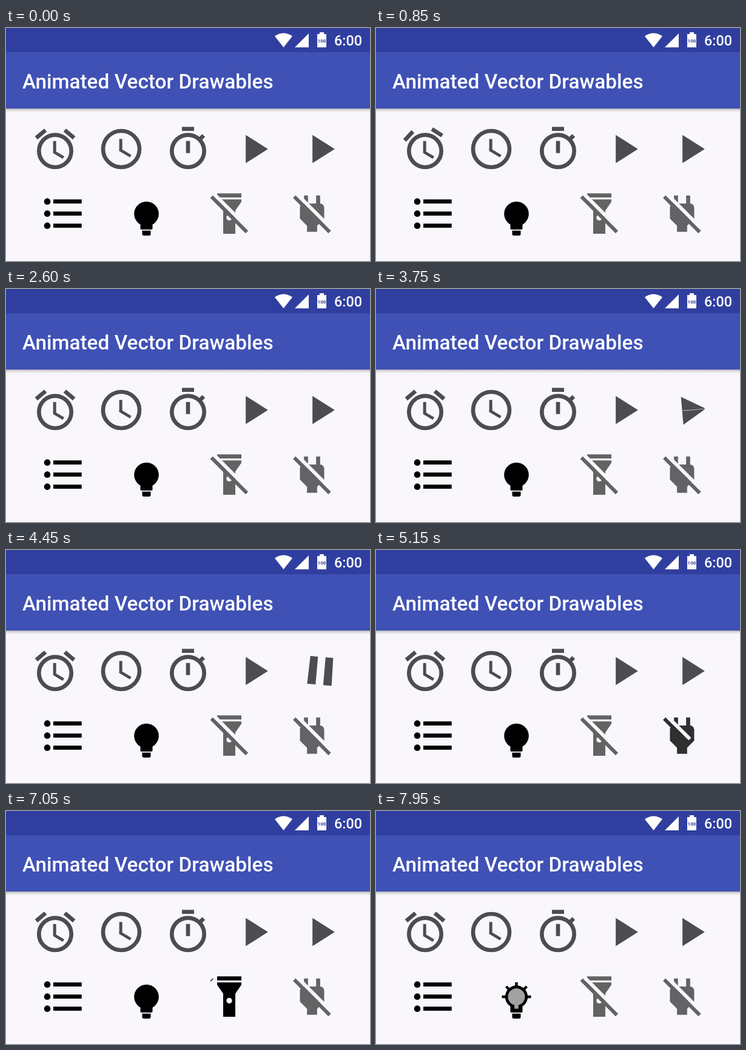
Recreate the animation shown at these times as an HTML page. Size 600x385 px, loop 8000 ms.

```html
<!DOCTYPE html>
<html lang="en">
<head>
<meta charset="utf-8">
<title>Animated Vector Drawables</title>
<style>
  html, body { margin: 0; width: 100%; height: 100%; overflow: hidden; background: #f9f7fb; }
  svg { display: block; width: 100vw; height: 100vh; }
  text { font-family: Roboto, sans-serif; font-weight: 500; fill: #fff; }
</style>
</head>
<body>
<svg viewBox="0 0 600 385">
  <defs>
    <linearGradient id="shade" x2="0" y2="1">
      <stop offset="0" stop-color="#000" stop-opacity=".3"/>
      <stop offset=".4" stop-color="#000" stop-opacity=".1"/>
      <stop offset="1" stop-color="#000" stop-opacity="0"/>
    </linearGradient>
    <mask id="torchMask" maskUnits="userSpaceOnUse" x="0" y="0" width="24" height="24">
      <path d="M0 0h24v24H0z" fill="#fff"/>
      <path id="torchGap" stroke="#000" stroke-width="1.8"/>
    </mask>
    <mask id="plugMask" maskUnits="userSpaceOnUse" x="0" y="0" width="24" height="24">
      <path d="M0 0h24v24H0z" fill="#fff"/>
      <path id="plugGap" stroke="#000" stroke-width="1.8"/>
    </mask>
  </defs>

  <rect width="600" height="385" fill="#f9f7fb"/>
  <rect y="133" width="600" height="7" fill="url(#shade)"/>
  <rect width="600" height="133" fill="#3f51b5"/>
  <rect width="600" height="40" fill="#303f9f"/>
  <g fill="#fff">
    <path d="M457.500 32L443 13.500Q457.500 3.500 472 13.500Z"/>
    <path d="M499 9V32H476Z"/>
    <path d="M517 7h7v3h4v22h-15V10h4z"/>
  </g>
  <text x="520.500" y="24" font-size="8" text-anchor="middle" style="fill:#303f9f;font-weight:700">100</text>
  <text x="541" y="29" font-size="23.330">6:00</text>
  <text x="27" y="99.500" font-size="33.330">Animated Vector Drawables</text>

  <!-- icons live on a 24-unit grid -->
  <g fill="#4d4c50">
    <g data-at="81 200">
      <circle cx="12" cy="13" r="8" fill="none" stroke="#4d4c50" stroke-width="2"/>
      <path d="M12.500 8H11v6l4.750 2.850.75-1.230-4-2.370z"/>
      <path id="bells" d="M22 5.720l-4.600-3.860-1.290 1.530 4.600 3.860zM7.880 3.390L6.600 1.860 2 5.710l1.290 1.530z"/>
    </g>
    <g data-at="190 200">
      <circle cx="12" cy="12" r="9" fill="none" stroke="#4d4c50" stroke-width="2"/>
      <path id="minute" d="M11 7h1.500v6H11z"/>
      <path id="hour" d="M11 13l5.250 3.150.75-1.230-4.500-2.670L11 12z"/>
    </g>
    <g data-at="300 200">
      <circle cx="12" cy="13" r="8" fill="none" stroke="#4d4c50" stroke-width="2"/>
      <path d="M17.300 6.300l1.740-1.740 1.410 1.410L18.700 7.700z"/>
      <path id="knob" d="M9 1h6v2H9z"/>
      <path id="hand" d="M11 8h2v6h-2z"/>
    </g>
    <g data-at="408.500 200"><path id="morph"/></g>
    <g data-at="518.500 200"><path id="spin"/></g>
  </g>

  <g data-at="94.700 306.700">
    <circle cx="4" cy="6" r="1.600"/><circle cx="4" cy="12" r="1.600"/><circle cx="4" cy="18" r="1.600"/>
    <path d="M7 5h14v2H7zM7 11h14v2H7zM7 17h14v2H7z"/>
  </g>

  <g data-at="231.500 306.700">
    <path id="rays" stroke="#000" stroke-width="1.300"/>
    <circle id="globe" cx="12" cy="12.100"/>
    <path d="M9 16.500h6v2.900q0 .5-.5.5h-5q-.5 0-.5-.5z"/>
    <path d="M9.900 20.400h4.200v1.700q0 .8-.8.8h-2.600q-.8 0-.8-.8z"/>
    <path id="glow" fill="#f9f7fb" d="M11 18v-1.820a4.200 4.200 0 1 1 2 0V18z"/>
  </g>

  <g data-at="368 306.700"><g id="torch">
    <path mask="url(#torchMask)" fill-rule="evenodd" d="M6 2h12v2H6zM6 5h12v1.200l-3 4.300V22H9V10.500L6 6.200zM10.600 14a1.400 1.400 0 1 0 2.800 0a1.400 1.400 0 1 0-2.800 0z"/>
    <path id="torchSlash" stroke="#000" stroke-width="1.800"/>
  </g></g>

  <g data-at="504.500 306.700"><g id="plug">
    <path mask="url(#plugMask)" d="M16.010 7L16 3h-2v4h-4V3H8v4C7 7 6 8 6 9v5.480L9.500 18v3h5v-3l3.500-3.510V9c0-1-1-2-1.990-2z"/>
    <path id="plugSlash" stroke="#000" stroke-width="1.800"/>
  </g></g>
</svg>

<script>
const LOOP = 8000;
const $ = id => document.getElementById(id);
const set = (id, name, value) => $(id).setAttribute(name, value);
const mix = (a, b, p) => a + (b - a) * p;
const span = (t, start, length) => Math.min(1, Math.max(0, (t - start) / length));
const smooth = x => 0.5 - 0.5 * Math.cos(Math.PI * x);

// cubic-bezier(.4, 0, .2, 1), solved by bisection
function swift(x) {
  let lo = 0, hi = 1;
  for (let i = 0; i < 22; i++) {
    const s = (lo + hi) / 2, r = 1 - s;
    if (1.2 * r * r * s + 0.6 * r * s * s + s * s * s < x) lo = s; else hi = s;
  }
  return lo * lo * (3 - 2 * lo);
}

// rises to 1 at "on", returns to 0 at "off"
const toggle = (t, on, off, length, ease) => ease(span(t, on, length)) - ease(span(t, off, length));
const turn = (id, angle, cy = 12) => set(id, "transform", `rotate(${angle} 12 ${cy})`);

function blend(from, to, p) {
  return from.map((shape, i) =>
    "M" + shape.map((v, j) => mix(v, to[i][j], p).toFixed(3)).join(" ") + "Z").join("");
}

const playSides = [[8, 5, 13.5, 8.5, 13.5, 15.5, 8, 19], [13.45, 8.47, 19, 12, 19, 12, 13.45, 15.53]];
const pauseSides = [[6, 5, 10, 5, 10, 19, 6, 19], [14, 5, 18, 5, 18, 19, 14, 19]];
const playHalves = [[8, 5, 19, 12, 19, 12.02, 8, 12.02], [8, 12, 19, 12, 19, 12, 8, 19]];
const pauseBars = [[5, 6, 19, 6, 19, 10, 5, 10], [5, 14, 19, 14, 19, 18, 5, 18]];

function drawSlash(id, on) {
  const length = 17.5 * (1 - on);
  const line = (x, y) => length > 0.01 ? `M${x} ${y}l${length} ${length}` : "";
  set(id + "Slash", "d", line(3.2, 3.6));
  set(id + "Gap", "d", line(4.47, 2.33));
  set(id, "opacity", 0.6 + 0.4 * Math.min(1, on * 1.5));
}

function drawBulb(p) {
  const reach = 5.5 + 2.6 * p;
  let d = "";
  for (let i = 0; i < 5 && p > 0; i++) {
    const a = Math.PI * (1 + i / 4), c = Math.cos(a), s = Math.sin(a);
    d += `M${12 + 5 * c} ${12.1 + 5 * s}L${12 + reach * c} ${12.1 + reach * s}`;
  }
  set("rays", "d", d);
  set("globe", "r", mix(6.1, 5.6, Math.min(1, p * 1.6)));
  set("glow", "opacity", p);
}

function draw(t) {
  const ring = span(t, 470, 600);
  turn("bells", 8 * Math.sin(ring * 12 * Math.PI), 13);

  const clock = swift(span(t, 1110, 600));
  turn("hour", 360 * clock);
  turn("minute", 1080 * clock);

  const timer = span(t, 1965, 600);
  turn("hand", 360 * swift(timer), 13);
  set("knob", "transform", `translate(0 ${Math.sin(Math.PI * span(timer, 0, 0.4))})`);

  set("morph", "d", blend(playSides, pauseSides, toggle(t, 2610, 3205, 330, swift)));
  const spin = toggle(t, 3705, 4405, 330, swift);
  set("spin", "d", blend(playHalves, pauseBars, spin));
  turn("spin", -90 * spin);

  drawSlash("plug", toggle(t, 4990, 5670, 400, smooth));
  drawSlash("torch", toggle(t, 6340, 7020, 400, smooth));
  drawBulb(swift(span(t, 7775, 420)));
}

for (const icon of document.querySelectorAll("[data-at]")) {
  const [x, y] = icon.dataset.at.split(" ").map(Number);
  icon.setAttribute("transform", `translate(${x - 40} ${y - 40}) scale(${10 / 3})`);
}

const begin = performance.now();
function tick() {
  draw((performance.now() - begin) % LOOP);
  requestAnimationFrame(tick);
}
tick();
</script>
</body>
</html>
```
